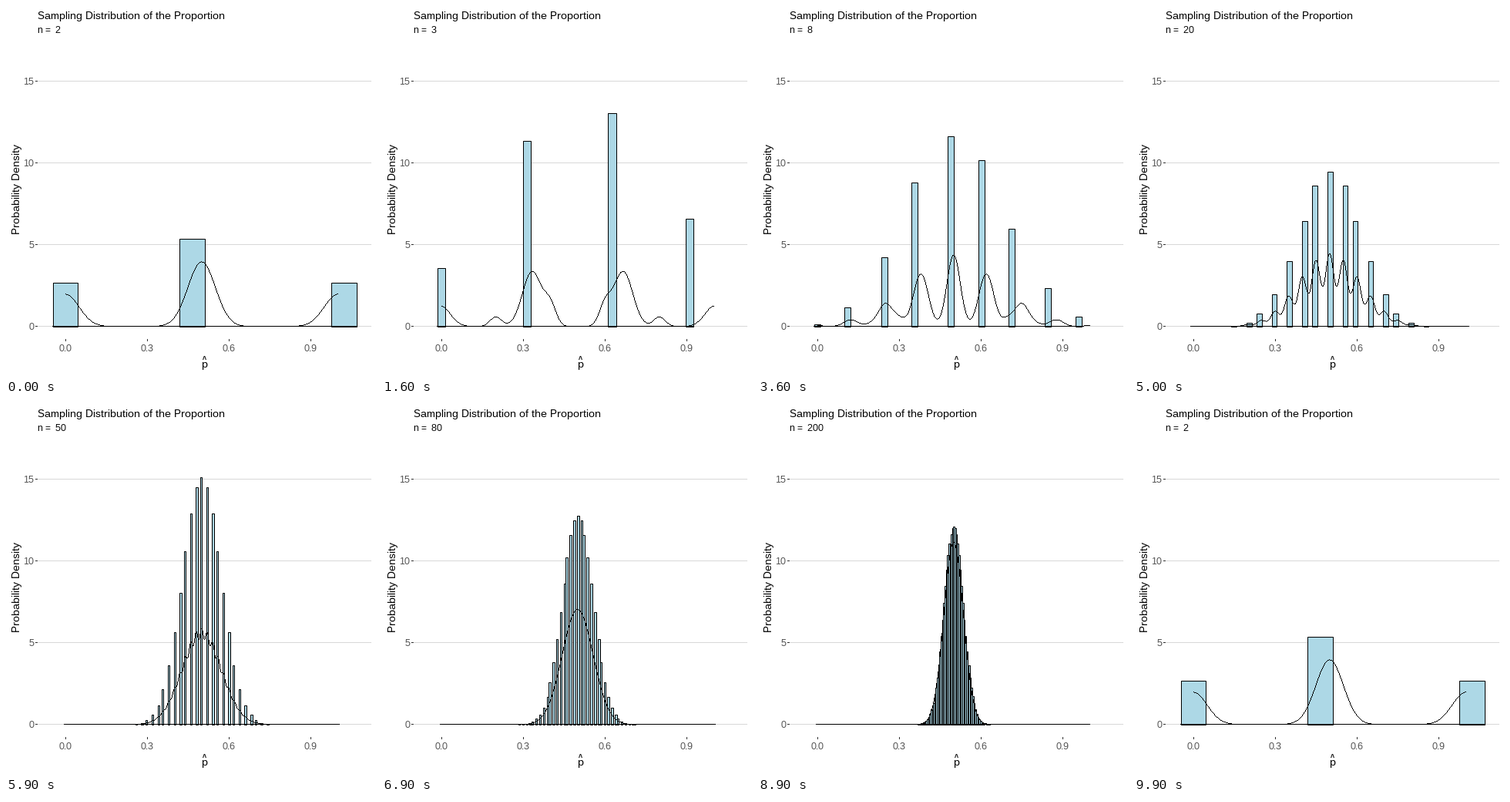
A matplotlib script that plays this animation: 480x480 px, repeating every 10 s.

```python
import math

import matplotlib
import matplotlib.pyplot as plt
import numpy as np
from matplotlib.animation import FuncAnimation
from matplotlib.collections import PolyCollection

matplotlib.rcParams.update({
    "font.family": "Liberation Sans",
    "text.hinting": "default",
    "text.hinting_factor": 1,
})

SIZE, DPI = 480, 100
PX = 72 / DPI  # points per pixel
SAMPLES = 10000
SIZES = [2, 3, 5, 8, 10, 20, 50, 80, 100, 200]
FRAMES, STEPS = 100, 5
STARTS = np.linspace(6, 95, len(SIZES)).round().astype(int)

# plot coordinates in pixels
X0, X_UNIT = 76.5, 353.65
Y0, Y_UNIT = 415.3, 21.2
COLUMNS = np.arange(77, 431)
CURVE_X = (np.append(COLUMNS, COLUMNS[-1] + 1) - .5 - X0) / X_UNIT


def to_x(v):
    return X0 + X_UNIT * np.asarray(v)


def to_y(v):
    return Y0 - Y_UNIT * np.asarray(v)


def cell(v):
    """Centre of the pixel that holds v."""
    return np.floor(v) + .5


class State:
    """Histogram (Freedman-Diaconis bins) and kernel density for one n."""

    def __init__(self, n):
        self.n = n
        k = np.arange(n + 1)
        p = k / n
        pmf = np.array([math.comb(n, int(i)) / 2 ** n for i in k])
        share = np.round(pmf * SAMPLES) / SAMPLES
        iqr = 1 - 2 * p[np.argmax(np.cumsum(pmf) >= .25)]

        self.width = 2 * iqr / SAMPLES ** (1 / 3)
        rows = np.floor(p / self.width + .5).astype(int)
        self.heights = np.bincount(rows, share) / self.width

        bw = .9 * min(.5 / math.sqrt(n), iqr / 1.34) * SAMPLES ** -.2
        z = (CURVE_X[:, None] - p) / bw
        kernel = np.exp(-z * z / 2) / (bw * math.sqrt(2 * math.pi))
        self.density = kernel @ share


STATES = [State(n) for n in SIZES]


def bar_edges(rows, width):
    return (rows - .5) * width, (rows + .5) * width


def blend(a, b, t):
    """Left edges, right edges, heights and density between two states."""
    if t == 0 or t == 1:
        s = b if t else a
        left, right = bar_edges(np.arange(len(s.heights)), s.width)
        return left, right, s.heights, s.density
    shared = min(len(a.heights), len(b.heights))
    left, right = bar_edges(np.arange(shared), a.width + (b.width - a.width) * t)
    heights = a.heights[:shared] * (1 - t) + b.heights[:shared] * t
    # surplus bars stay put until the change is over
    old_left, old_right = bar_edges(np.arange(shared, len(a.heights)), a.width)
    return (np.append(left, old_left), np.append(right, old_right),
            np.append(heights, a.heights[shared:]),
            a.density * (1 - t) + b.density * t)


def position(frame):
    """Index of the current state and progress towards the next one."""
    for i, start in enumerate(STARTS):
        if frame < start + STEPS:
            return i, max(0, frame - start + 1) / STEPS
    return 0, 0


def curve_cells(density):
    """One crisp run of pixels per column, joined along the curve."""
    y = to_y(density) + .5
    low, high = np.minimum(y[:-1], y[1:]), np.maximum(y[:-1], y[1:])
    top, bottom = np.round(low), np.round(high)
    flat = top == bottom
    top = np.where(flat, np.floor((low + high) / 2), top)
    bottom = np.where(flat, top + 1, bottom)
    return [[(x, t), (x + 1, t), (x + 1, b), (x, b)]
            for x, t, b in zip(COLUMNS, top, bottom)]


fig = plt.figure(figsize=(SIZE / DPI, SIZE / DPI), dpi=DPI, facecolor="white")
ax = fig.add_axes([0, 0, 1, 1])
ax.set_xlim(0, SIZE)
ax.set_ylim(SIZE, 0)
ax.axis("off")


def line(xs, ys, color="black", z=1):
    item, = ax.plot(xs, ys, color=color, lw=PX, zorder=z, snap=False,
                    solid_capstyle="butt")
    return item


def label(x, y, s, size, color="black", ha="left", **kw):
    return ax.text(x, y, s, fontsize=size * PX, color=color, ha=ha,
                   va="baseline", rotation_mode="anchor", **kw)


def polygons(z, **kw):
    item = PolyCollection([], zorder=z, **kw)
    ax.add_collection(item, autolim=False)
    return item


for v in (0, 5, 10, 15):
    y = cell(to_y(v) + .5)
    line([41, 474], [y, y], "#D8D8D8")
    line([38, 41], [y, y], "#333333")
    label(36.5, y + 5, str(v), 12, "#4D4D4D", "right")
for v in (0, .3, .6, .9):
    x = cell(to_x(v) + .5)
    line([x, x], [432, 435], "#333333")
    label(x - .5, 448, f"{v:.1f}", 12, "#4D4D4D", "center")

label(41, 17, "Sampling Distribution of the Proportion", 14)
label(18, 237.5, "Probability Density", 14, ha="center", rotation=90)
label(257, 469, "p", 14, ha="center")
label(257, 464, "^", 14, ha="center")
subtitle = label(41, 35, "", 12)

bars = polygons(2, facecolors="#ADD8E6", edgecolors="black", linewidths=PX,
                joinstyle="miter")
base = line([], [], z=3)
curve = polygons(4, facecolors="black", edgecolors="none", linewidths=0,
                 antialiaseds=False)


def draw(frame):
    i, t = position(frame)
    a, b = STATES[i], STATES[(i + 1) % len(STATES)]
    left, right, heights, density = blend(a, b, t)
    x0, x1 = cell(to_x(left)), cell(to_x(right))
    top, floor = cell(to_y(heights)), cell(to_y(0))
    bars.set_verts([[(l, floor), (l, y), (r, y), (r, floor)]
                    for l, r, y in zip(x0, x1, top) if y < floor])
    base.set_data([x0.min() - .5, x1.max() + .5], [floor, floor])
    curve.set_verts(curve_cells(density))
    subtitle.set_text(f"n =  {(a if t < .5 else b).n}")
    return bars, base, curve, subtitle


anim = FuncAnimation(fig, draw, frames=FRAMES, interval=100, repeat=True,
                     repeat_delay=0, blit=False)
plt.show()
```
